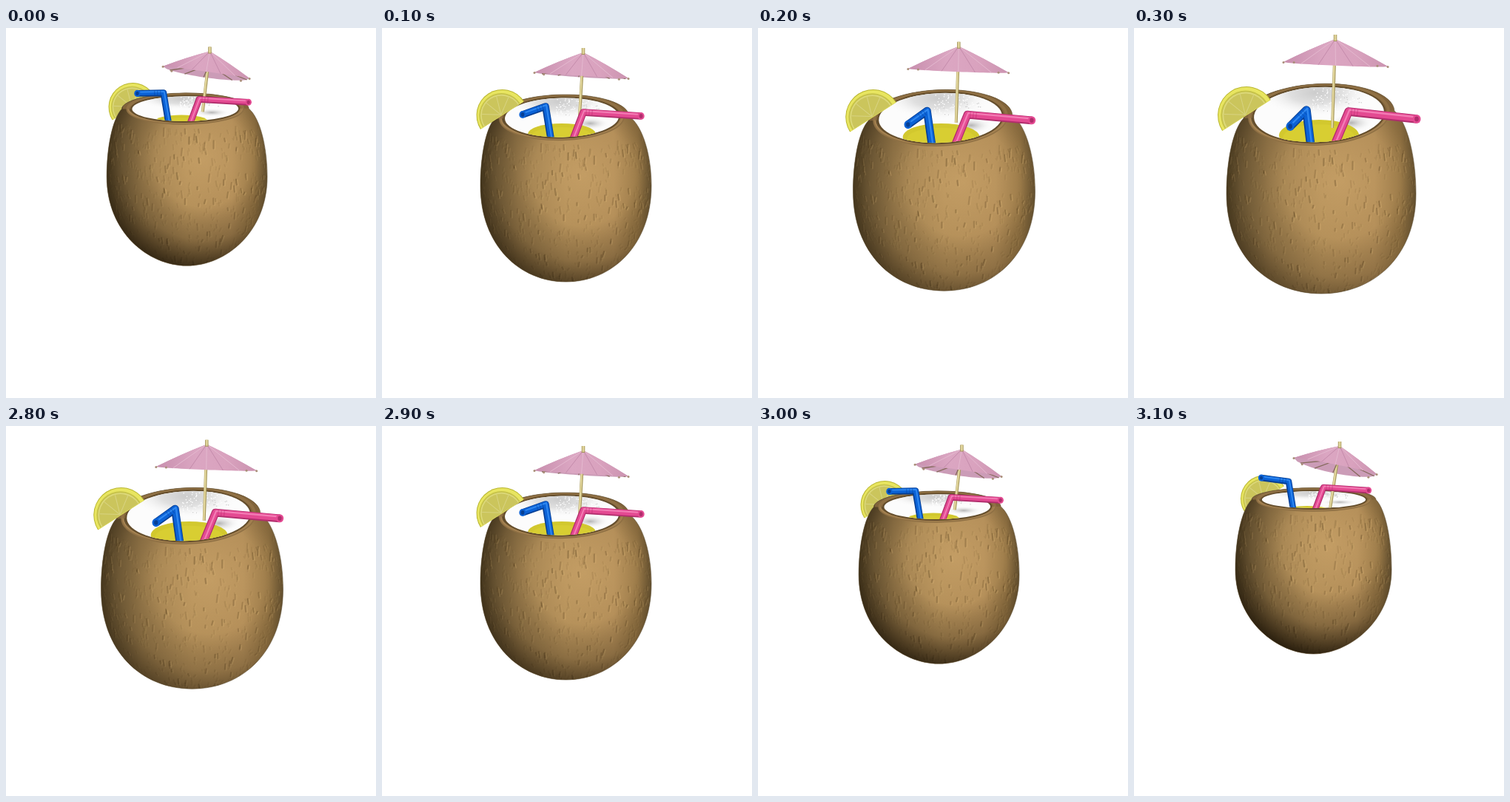
Animation of 500x500 px, one loop 5600 ms. Source, as an HTML page with a canvas:

```html
<!DOCTYPE html>
<html lang="en">
<head>
<meta charset="utf-8">
<title>Coconut drink</title>
<style>
  html, body { margin: 0; width: 100%; height: 100%; overflow: hidden; background: #fff; }
  canvas { display: block; }
</style>
</head>
<body>
<canvas id="stage" width="500" height="500"></canvas>
<script>
const ctx = document.getElementById('stage').getContext('2d');
const { PI, sin, cos, sqrt, max } = Math;

// Each value is given at low, middle and high tilt; points are [x, y].
const KEYS = {
  left: [137, 133, 125], right: [348, 364, 381], waist: [194, 213, 224],
  bottom: [308, 343, 359], round: [.45, .54, .56], shade: [.95, .85, .7],
  rim: [[243, 243, 250], [99.5, 121, 117]], rx: [70, 77, 88], ry: [11.5, 26.5, 37], tilt: [0, -.02, -.05],
  juice: [[234, 243, 250], [114, 143, 145]], jx: [30, 46, 54], jy: [6, 14, 21],
  lime: [[176, 162.5, 152], [98.5, 118, 118]], limeR: [32, 35, 39],
  tip: [[278, 272, 272], [21, 27, 9]], stickEnd: [[265, 267, 268], [112, 119, 135]],
  canopyL: [[216, 206, 202], [43, 60, 46]], canopyR: [[328, 333, 343], [65, 68, 52]], sag: [10, 2.5, -1],
  strawW: [8.5, 9.7, 11.5],
  blue: [[[172, 190, 211], [70, 117, 133]], [[209, 221, 233], [75, 106, 111]], [[216, 229, 239], [118, 155, 160]]],
  pink: [[[317, 350, 382], [87, 119, 123]], [[256, 272, 290], [83, 114, 113]], [[243, 257, 271], [118, 153, 158]]]
};
const TILTS = [0, .16, .5, .81, 1];
const TIMELINE = [[100, 1], [200, 2], [300, 3], [2800, 4], [2900, 3], [3000, 2], [3100, 1], [5600, 0]];

function valueAt(key, s) {
  if (Array.isArray(key[0])) return key.map(k => valueAt(k, s));
  const [a, b, c] = key;
  return a + s * (4 * b - 3 * a - c) + s * s * (2 * a - 4 * b + 2 * c);
}

function randomFrom(seed) {
  return () => (seed = (seed * 16807) % 2147483647) / 2147483647;
}

function gradient(g, stops) {
  stops.forEach(([at, color]) => g.addColorStop(at, color));
  return g;
}

function line(points, width, color) {
  ctx.beginPath();
  points.forEach(([x, y]) => ctx.lineTo(x, y));
  ctx.lineWidth = width;
  ctx.strokeStyle = color;
  ctx.stroke();
}

function oval(x, y, rx, ry, color, tilt = 0) {
  ctx.beginPath();
  ctx.ellipse(x, y, rx, ry, tilt, 0, 2 * PI);
  ctx.fillStyle = color;
  ctx.fill();
}

function drawLime({ lime, limeR: r }) {
  const half = (radius, color) => {
    ctx.beginPath();
    ctx.arc(0, 0, radius, PI, 2 * PI);
    ctx.closePath();
    ctx.fillStyle = color;
    ctx.fill();
  };
  ctx.save();
  ctx.translate(...lime);
  ctx.rotate(-.57);
  half(r, '#b9b62f');
  half(r - 1, '#e8e560');
  ctx.translate(-1, -.5);
  half(r * .86, '#c6c24a');
  half(r * .81, '#dcd87a');
  half(r * .76, '#cbc55c');
  for (let i = 1; i < 5; i++) {
    const a = PI + i * PI / 5;
    line([[0, -1], [cos(a) * r * .75, sin(a) * r * .75]], 1, '#d8d382');
  }
  ctx.restore();
}

function drawBody(p) {
  const { left, right, waist, bottom, round, rim: [x, y], rx, ry, tilt } = p;
  const mid = (left + right) / 2, half = (right - left) / 2;
  const outX = rx + 14, outY = ry + 4.5;
  const front = y + ry, height = bottom - front;
  const path = new Path2D();
  const side = dir => {
    const edge = mid + dir * half, endX = x + dir * outX, endY = y + dir * outX * sin(tilt);
    return {
      edge, endX, endY,
      topX: endX + (edge - endX) * .64, topY: endY + (waist - endY) * .15,
      upY: waist - (waist - endY) * .42, downY: waist + (bottom - waist) * .62,
      lowX: mid + dir * half * round
    };
  };
  const l = side(-1), r = side(1);
  path.ellipse(x, y, outX, outY, tilt, PI, 2 * PI);
  path.bezierCurveTo(r.topX, r.topY, r.edge, r.upY, r.edge, waist);
  path.bezierCurveTo(r.edge, r.downY, r.lowX, bottom, mid, bottom);
  path.bezierCurveTo(l.lowX, bottom, l.edge, l.downY, l.edge, waist);
  path.bezierCurveTo(l.edge, l.upY, l.topX, l.topY, l.endX, l.endY);

  ctx.save();
  ctx.clip(path);
  ctx.fillStyle = gradient(ctx.createLinearGradient(left, 0, right, 0), [
    [0, '#66532f'], [.07, '#806840'], [.22, '#9c7d4d'], [.5, '#b28e58'],
    [.78, '#b18c57'], [.92, '#967645'], [1, '#6b5633']]);
  ctx.fillRect(0, 0, 500, 500);

  const lx = mid + half * .2, ly = front + height * .26;
  const glow = (inner, outer, stops) => {
    ctx.fillStyle = gradient(ctx.createRadialGradient(lx, ly, half * inner, lx, ly, half * outer), stops);
    ctx.fillRect(0, 0, 500, 500);
  };
  glow(0, .8, [[0, 'rgba(212,172,112,.5)'], [1, 'rgba(212,172,112,0)']]);

  const rand = randomFrom(4127);
  ctx.lineCap = 'round';
  for (let i = 0; i < 620; i++) {
    const lon = (rand() - .5) * 3, v = .05 + rand() * .94, bold = i > 430;
    const w = sqrt(max(0, 1 - ((v - .3) / .73) ** 2));
    const mx = mid + half * w * sin(lon);
    const my = front + v * height - (1 - cos(lon)) * ry * (1 - v);
    const len = (bold ? 3 + rand() * 8 : 2 + rand() * 5) * (1.1 - v * .5);
    const lean = (rand() - .5) * 3 - sin(lon) * (v - .3) * 4;
    const width = (bold ? 2.4 : 2) * (.4 + .6 * cos(lon));
    const alpha = bold ? .12 + rand() * .22 : .09;
    line([[mx + 1.6, my + 1], [mx + 1.6 + lean, my + len + 1]], width, `rgba(220,182,120,${alpha})`);
    line([[mx, my], [mx + lean, my + len]], width, `rgba(84,61,28,${alpha})`);
  }
  ctx.lineCap = 'butt';

  glow(.6, 1.42, [
    [0, 'rgba(35,25,10,0)'], [.5, `rgba(35,25,10,${p.shade * .32})`], [1, `rgba(35,25,10,${p.shade})`]]);

  const ring = (grow, width, color, from, to) => {
    ctx.beginPath();
    ctx.ellipse(x, y, rx + grow, ry + grow * .45, tilt, from, to);
    ctx.lineWidth = width;
    ctx.strokeStyle = color;
    ctx.stroke();
  };
  ring(7, 12, '#80633a', PI, 2 * PI);
  ring(6, 4, '#8f7044', 0, 2 * PI);
  ring(5, 2, '#a48150', 0, PI);
  ring(0, 4, '#644d2b', 0, 2 * PI);
  ctx.restore();
  ctx.lineWidth = 1;
  ctx.strokeStyle = 'rgba(90,75,50,.55)';
  ctx.stroke(path);
}

function drawInside({ rim: [x, y], rx, ry, tilt, juice: [jx, jy], jx: jrx, jy: jry }) {
  ctx.save();
  oval(x, y, rx, ry, '#fcfcfc', tilt);
  ctx.clip();
  ctx.translate(x, y);
  ctx.scale(rx, ry);
  ctx.fillStyle = gradient(ctx.createRadialGradient(-.05, -.8, 0, -.05, -.8, .9), [
    [0, '#cccccc'], [.45, '#e0e0e0'], [1, 'rgba(255,255,255,0)']]);
  ctx.fillRect(-1, -1, 2, 2);
  ctx.fillStyle = gradient(ctx.createRadialGradient(.5, .3, 0, .5, .3, .35), [
    [0, '#b4b4b4'], [1, 'rgba(255,255,255,0)']]);
  ctx.fillRect(-1, -1, 2, 2);
  const rand = randomFrom(77);
  for (let i = 0; i < 110; i++) {
    oval(-.1 + rand() * .75, -.95 + rand() * .85, .8 / rx, .8 / ry, i % 4 ? '#fff' : '#cfcfcf');
  }
  ctx.setTransform(1, 0, 0, 1, 0, 0);
  oval(jx, jy, jrx, jry, '#d2c82e');
  oval(jx, jy + 3, jrx * .9, jry * .85, '#d8ce32');
  ctx.restore();
}

function drawStraw([mouth, elbow, end], w, dark, main, light) {
  const shift = d => [mouth, elbow, end].map(([x, y]) => [x + d * .5, y - d]);
  ctx.lineJoin = 'round';
  line(shift(0), w, dark);
  line(shift(.6), w - 2.5, main);
  line(shift(w * .2), w * .2, light);
  // Bellows beside the bend
  const dx = mouth[0] - elbow[0], dy = mouth[1] - elbow[1], d = Math.hypot(dx, dy);
  for (let i = 1; i < 4; i++) {
    const x = elbow[0] + dx / d * i * 4, y = elbow[1] + dy / d * i * 4, k = w * .4 / d;
    line([[x - dy * k, y + dx * k], [x + dy * k, y - dx * k]], .5, dark);
  }
  oval(...mouth, w * .48, w * .52, main);
  oval(...mouth, w * .25, w * .3, dark);
}

function drawUmbrella({ tip, stickEnd, canopyL: l, canopyR: r, sag }) {
  const apex = [tip[0], tip[1] + 6];
  const brim = 1.5 - sag * .35;
  const edge = (t, bend) => [
    l[0] + (r[0] - l[0]) * t,
    l[1] + (r[1] - l[1]) * t + 2 * bend * sqrt(t * (1 - t))];
  // Outer slopes bulge a little
  const shoulder = ([x, y]) => [(x + apex[0]) / 2, (y + apex[1]) / 2 - 2];
  const cone = (bend, color) => {
    ctx.beginPath();
    ctx.moveTo(...apex);
    ctx.quadraticCurveTo(...shoulder(l), ...l);
    for (let i = 1; i <= 24; i++) ctx.lineTo(...edge(i / 24, bend));
    ctx.quadraticCurveTo(...shoulder(r), ...apex);
    ctx.fillStyle = color;
    ctx.fill();
  };
  cone(sag, '#cb9cb7');
  line([apex, stickEnd], 4, '#a89a5e');
  line([[apex[0] - .4, apex[1]], [stickEnd[0] - .4, stickEnd[1]]], 2.4, '#e2d69c');
  if (sag > 1) {
    const hub = [apex[0] - 1, apex[1] + 18];
    for (const t of [.08, .25, .47, .8, .97]) line([hub, edge(t, sag)], 1.3, '#866a5c');
  }
  cone(brim, gradient(ctx.createLinearGradient(l[0], 0, r[0], 0), [
    [0, '#c88fae'], [.4, '#dba6c2'], [.7, '#d9a2be'], [1, '#cb93b0']]));
  for (let i = 1; i < 6; i++) line([apex, edge(i / 6, brim)], 1, i % 2 ? '#e4b9cf' : '#c48bab');
  for (const t of [0, .1, .9, 1]) {
    const [x, y] = edge(t, sag);
    oval(x, y + .5, 1.5, 1.5, '#a98f78');
  }
  line([tip, [apex[0], apex[1] + 3]], 4.5, '#a3945a');
  line([tip, [apex[0], apex[1] + 2]], 2.8, '#e0d49a');
}

function drawScene(s) {
  const p = {};
  for (const name in KEYS) p[name] = valueAt(KEYS[name], s);
  const [x, y] = p.rim;
  ctx.clearRect(0, 0, 500, 500);
  if (s < .3) drawLime(p);
  drawBody(p);
  drawInside(p);
  if (s > .3) drawLime(p);

  // The front lip hides whatever stands in the drink.
  ctx.save();
  ctx.beginPath();
  ctx.rect(0, 0, 500, y);
  ctx.rect(x + p.rx * .6, y, 200, 60);
  ctx.ellipse(x, y, p.rx, p.ry, p.tilt, 0, 2 * PI);
  ctx.clip();
  drawUmbrella(p);
  drawStraw(p.blue, p.strawW, '#063f94', '#0b62d6', '#2f88f0');
  drawStraw(p.pink, p.strawW, '#b02d6c', '#e44a92', '#f37db5');
  ctx.restore();
}

let shown = -1;
function tick() {
  const t = performance.now() % 5600;
  const pose = TIMELINE.find(([end]) => t < end)[1];
  if (pose !== shown) drawScene(TILTS[shown = pose]);
  requestAnimationFrame(tick);
}
tick();
</script>
</body>
</html>
```
